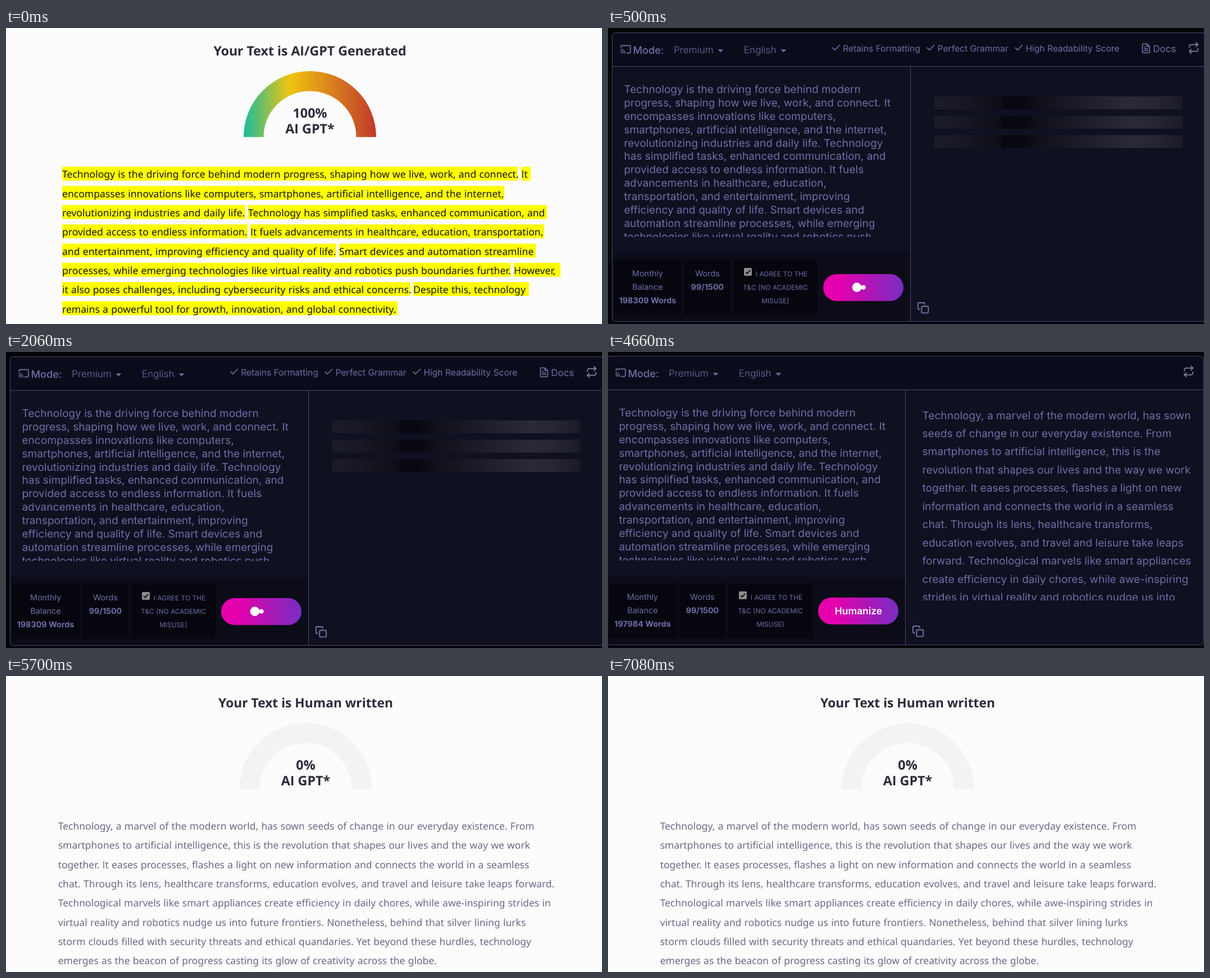
An HTML page that plays this animation: 1061x528 px, repeating every 8000 ms.

```html
<!DOCTYPE html>
<html lang="en">
<head>
<meta charset="utf-8">
<title>Humanize text</title>
<style>
html, body { margin: 0; width: 100%; height: 100%; overflow: hidden; background: #000; }
svg { display: block; width: 1061px; height: 528px; text-rendering: geometricPrecision; }
.report { font: 17.5px "Noto Sans", sans-serif; word-spacing: .7px; }
#before { font-size: 17.56px; }
.cap, .head { font-family: "Open Sans", sans-serif; }
.head { font-size: 23.3px; font-weight: 700; fill: #2b2b39; word-spacing: 0; text-anchor: middle; }
.app { font: 19.1px Inter, sans-serif; font-optical-sizing: none; fill: #6f6ea8; }
.mid { text-anchor: middle; }
.icon { fill: none; stroke: #7675ac; stroke-width: 2; stroke-linecap: round; stroke-linejoin: round; }
</style>
</head>
<body>
<svg viewBox="0 0 1061 528" xmlns="http://www.w3.org/2000/svg">
  <defs>
    <linearGradient id="heat">
      <stop stop-color="#1abc9c"/><stop offset=".35" stop-color="#f1c40f"/><stop offset="1" stop-color="#c0392b"/>
    </linearGradient>
    <linearGradient id="pill">
      <stop offset=".2" stop-color="#e400ac"/><stop offset="1" stop-color="#782dc2"/>
    </linearGradient>
    <linearGradient id="shine">
      <stop stop-color="#1b1c27"/><stop offset=".13" stop-color="#161722"/>
      <stop offset=".27" stop-color="#0c0d16"/><stop offset=".272" stop-color="#080810"/>
      <stop offset=".355" stop-color="#080810"/><stop offset=".42" stop-color="#0f101a"/>
      <stop offset=".6" stop-color="#1c1d28"/><stop offset=".79" stop-color="#292a35"/>
      <stop offset=".88" stop-color="#262732"/><stop offset="1" stop-color="#1a1b27"/>
    </linearGradient>
    <clipPath id="inputClip"><rect x="20" y="90" width="510" height="283"/></clipPath>
    <clipPath id="outputClip"><rect x="560" y="90" width="500" height="354"/></clipPath>
  </defs>
  <g id="before" class="report"></g>
  <g id="app" class="app"></g>
  <g id="after" class="report"></g>
</svg>
<script>
const $ = id => document.getElementById(id);
const rect = (x, y, w, h, fill, more = '') =>
  `<rect x="${x}" y="${y}" width="${w}" height="${h}" fill="${fill}" ${more}/>`;
const text = (x, y, s, more = '') => `<text x="${x}" y="${y}" ${more}>${s}</text>`;
const lines = (x, y, step, list, more) =>
  list.map((s, i) => text(x, y + i * step, s, more)).join('');
const icon = (x, y, k, d, more = '') =>
  `<path class="icon" transform="translate(${x} ${y}) scale(${k})" d="${d}" ${more}/>`;
const plainI = s => s.replace(/I/g, '<tspan class="cap">I</tspan>');

// Detector reports
const gauge = (cx, cy, fill) =>
  `<path fill="${fill}" d="M${cx - 118} ${cy}a118 117.5 0 0 1 236 0h-35.5a82.5 82 0 0 0 -165 0z"/>`;

const report = (cx, top, title, size, score, fill) =>
  rect(0, 0, 1061, 528, '#fcfcfd') +
  text(cx, top, title, `class="head" style="font-size:${size}px"`) +
  gauge(cx, top + 145.9, fill) +
  text(cx, top + 111.3, score, 'class="head"') +
  text(cx, top + 139.8, 'AI GPT*', 'class="head"');

const STEP = 34.3;

// Each row: start, end, sentence part, ...
const marked = [
  [100, 911, 'Technology is the driving force behind modern progress, shaping how we live, work, and connect.', 917.5, 934, 'It'],
  [100, 887, 'encompasses innovations like computers, smartphones, artificial intelligence, and the internet,'],
  [100, 426, 'revolutionizing industries and daily life.', 431, 963, 'Technology has simplified tasks, enhanced communication, and'],
  [100, 430, 'provided access to endless information.', 435, 958, 'It fuels advancements in healthcare, education, transportation,'],
  [100, 587.5, 'and entertainment, improving efficiency and quality of life.', 593, 943, 'Smart devices and automation streamline'],
  [100, 898.5, 'processes, while emerging technologies like virtual reality and robotics push boundaries further.', 904, 987, 'However,'],
  [100, 719.5, 'it also poses challenges, including cybersecurity risks and ethical concerns.', 725, 931, 'Despite this, technology'],
  [100, 697, 'remains a powerful tool for growth, innovation, and global connectivity.']
];

function highlights() {
  let out = '';
  marked.forEach((row, i) => {
    const y = 267.4 + i * STEP;
    for (let k = 0; k < row.length; k += 3)
      out += rect(row[k], y - 20, row[k + 1] - row[k], 24.8, '#ffff00') +
        text(row[k], y, plainI(row[k + 2]), 'fill="#15150a"');
  });
  return out;
}

const rewritten = [
  'Technology, a marvel of the modern world, has sown seeds of change in our everyday existence. From',
  'smartphones to artificial intelligence, this is the revolution that shapes our lives and the way we work',
  'together. It eases processes, flashes a light on new information and connects the world in a seamless',
  'chat. Through its lens, healthcare transforms, education evolves, and travel and leisure take leaps forward.',
  'Technological marvels like smart appliances create efficiency in daily chores, while awe-inspiring strides in',
  'virtual reality and robotics nudge us into future frontiers. Nonetheless, behind that silver lining lurks',
  'storm clouds filled with security threats and ethical quandaries. Yet beyond these hurdles, technology',
  'emerges as the beacon of progress casting its glow of creativity across the globe.'
].map(plainI);

$('before').innerHTML =
  report(541, 48.5, 'Your Text is AI/GPT Generated', 23.1, '100%', 'url(#heat)') + highlights();
$('after').innerHTML =
  report(533.5, 55.6, 'Your Text is Human written', 22.8, '0%', '#f1f4f3') +
  lines(92.7, 274, STEP, rewritten, 'fill="#676b86"');

// Editor
const input = [
  'Technology is the driving force behind modern',
  'progress, shaping how we live, work, and connect. It',
  'encompasses innovations like computers,',
  'smartphones, artificial intelligence, and the internet,',
  'revolutionizing industries and daily life. Technology',
  'has simplified tasks, enhanced communication, and',
  'provided access to endless information. It fuels',
  'advancements in healthcare, education,',
  'transportation, and entertainment, improving',
  'efficiency and quality of life. Smart devices and',
  'automation streamline processes, while emerging',
  'technologies like virtual reality and robotics push'
];
const output = [
  'Technology, a marvel of the modern world, has sown',
  'seeds of change in our everyday existence. From',
  'smartphones to artificial intelligence, this is the',
  'revolution that shapes our lives and the way we work',
  'together. It eases processes, flashes a light on new',
  'information and connects the world in a seamless',
  'chat. Through its lens, healthcare transforms,',
  'education evolves, and travel and leisure take leaps',
  'forward. Technological marvels like smart appliances',
  'create efficiency in daily chores, while awe-inspiring',
  'strides in virtual reality and robotics nudge us into'
];
const font = (size, weight = 400) => `style="font-size:${size}px;font-weight:${weight}"`;
const small = 'class="mid" ' + font(14.5);
const bold = 'class="mid" ' + font(14.3, 700);
const legal = 'class="mid" ' + font(11.95);
const caret = x => `<path d="M${x} 38.3h10l-5 5z"/>`;
const perk = (x, s) =>
  icon(x - 21.5, 26, .78, 'M20 6L9 17l-5-5') + text(x, 41.5, s, font(15.6));

const frame =
  rect(7.5, 8.5, 1062, 515, '#0f1020', 'rx="5"') +
  rect(8, 9, 1061, 59, '#0b0c1b', 'rx="4"') +
  rect(8, 402, 530, 121, '#0b0c18') +
  rect(7.5, 8.5, 1062, 515, 'none', 'rx="5" stroke="#4b4770"') +
  '<path d="M8 68.5H1069M538.5 68.5V523" stroke="#4b4770" fill="none"/>';

const header =
  icon(21.6, 28, .83, 'M2 8V6a2 2 0 0 1 2-2h16a2 2 0 0 1 2 2v12a2 2 0 0 1-2 2h-6M2 16.1A5 5 0 0 1 5.9 20M2 12.05A9 9 0 0 1 9.95 20M2 20h.01') +
  text(44.5, 45.5, 'Mode:', font(18.2, 500)) +
  text(117, 45.3, 'Premium', font(17.2, 300)) + caret(195.5) +
  text(241.8, 45.3, 'English', font(17.2, 300)) + caret(307.5) +
  icon(1032.3, 25.3, .86, 'M17 1l4 4-4 4M3 11V9a4 4 0 0 1 4-4h14M7 23l-4-4 4-4M21 13v2a4 4 0 0 1-4 4H3', 'style="stroke:#85859c"');

const footer =
  rect(11, 414.5, 120, 97, '#06060f') + rect(136, 414.5, 81.5, 97, '#06060f') + rect(224, 414.5, 149, 97, '#06060f') +
  text(70.5, 443, 'Monthly', small) + text(70.5, 467.3, 'Balance', small) +
  `<text id="balance" x="70.5" y="491.3" ${bold}></text>` +
  text(177, 443, 'Words', small) + text(177, 467, '99/1500', bold) +
  rect(242, 428, 14, 14, '#8d8d8d', 'rx="2"') +
  '<path d="M245 435.2l2.8 2.8 5.4-6" fill="none" stroke="#15151a" stroke-width="2"/>' +
  text(309, 443, 'I AGREE TO THE', legal) +
  text(298, 467, 'T&amp;C (NO ACADEMIC', legal) +
  text(298, 491.3, 'MISUSE)', legal) +
  rect(383, 439, 143, 48, 'url(#pill)', 'rx="24"') +
  icon(550, 488.2, .92, 'M11 9h9a2 2 0 0 1 2 2v9a2 2 0 0 1-2 2h-9a2 2 0 0 1-2-2v-9a2 2 0 0 1 2-2zM5 15H4a2 2 0 0 1-2-2V4a2 2 0 0 1 2-2h9a2 2 0 0 1 2 2v1');

const busy =
  perk(418.2, 'Retains Formatting') + perk(586.6, 'Perfect Grammar') + perk(743.4, 'High Readability Score') +
  icon(948.2, 26.6, .8, 'M14 2H6a2 2 0 0 0-2 2v16a2 2 0 0 0 2 2h12a2 2 0 0 0 2-2V8zM14 2v6h6M16 13H8M16 17H8M10 9H8') +
  text(970.2, 43, 'Docs', font(17)) +
  [122, 156.5, 191].map(y => rect(581, y, 442, 23, 'url(#shine)', 'rx="4"')).join('') +
  '<g fill="#fff"><circle cx="443" cy="462.6" r="8.3"/><circle cx="454.6" cy="462.6" r="4.2"/></g>';

const done =
  `<g clip-path="url(#outputClip)">${lines(568.5, 120.5, 32.45, output)}</g>` +
  text(455, 468.6, 'Humanize', 'class="mid" fill="#fff" ' + font(17.4, 600));

$('app').innerHTML = rect(0, 0, 1061, 528, '#030308') +
  `<g id="panel">${frame}${header}${footer}
    <g clip-path="url(#inputClip)">${lines(28.4, 116, 23.88, input)}</g>
    <g id="busy">${busy}</g><g id="done">${done}</g></g>`;

// Timeline
const LOOP = 8000, CUTS = [500, 3100, 5700];
const show = (id, on) => $(id).setAttribute('display', on ? 'inline' : 'none');

function draw(ms) {
  const t = ms % LOOP;
  const scene = CUTS.filter(c => t >= c).length;
  const ready = scene === 2;
  show('before', scene === 0);
  show('app', scene === 1 || ready);
  show('after', scene === 3);
  show('busy', !ready);
  show('done', ready);
  $('balance').textContent = (ready ? 197984 : 198309) + ' Words';
  $('panel').setAttribute('transform', ready ? 'translate(-9 -1)' : '');
}

function tick() {
  draw(performance.now());
  requestAnimationFrame(tick);
}
tick();
</script>
</body>
</html>
```
